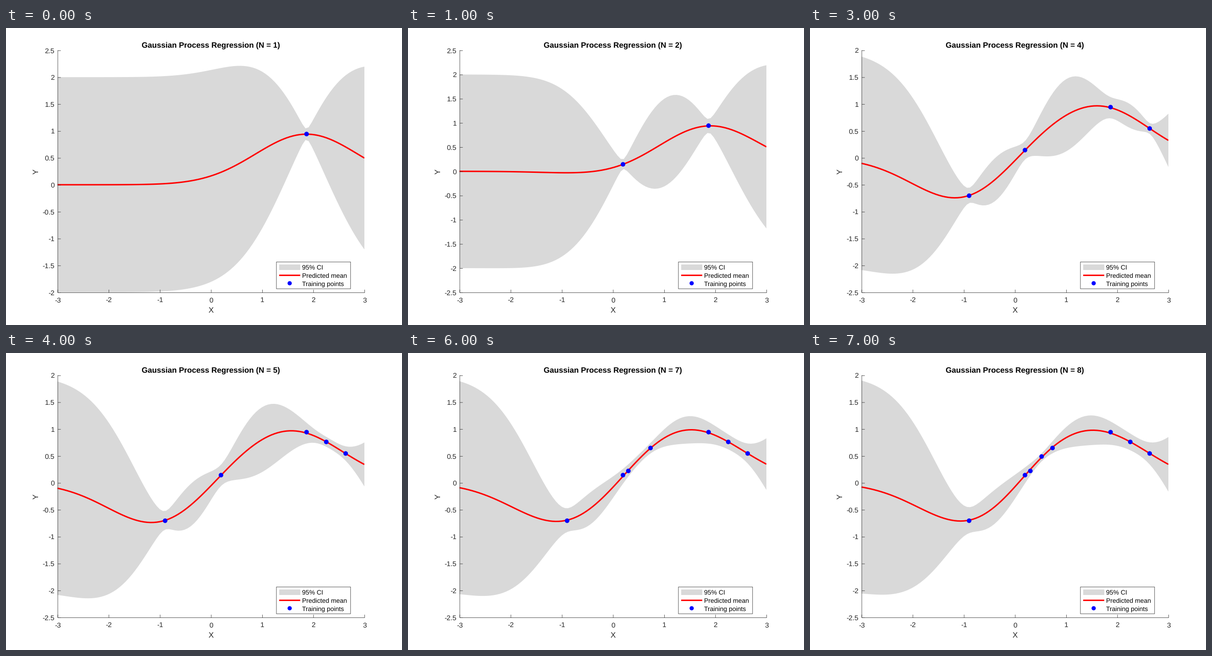
Recreate the animation shown at these times as a matplotlib script. Size 864 px wide and 648 px high, loop 8 s.

```python
import numpy as np
import matplotlib.pyplot as plt
from matplotlib.animation import FuncAnimation
from matplotlib.lines import Line2D
from matplotlib.patches import Circle, Rectangle

W, H, DPI = 864, 648, 100
LEFT, RIGHT = 0.13 * W, 0.905 * W
TOP, BOTTOM = 0.075 * H, 0.89 * H
PT = 72 / DPI  # points per pixel
INK, GREY = "#262626", "#d9d9d9"
HAIR, TICK = 0.8, 6.5  # axis line width and tick length in pixels
SHIFT = 0.7  # axis lines sit slightly right of and below the plot edge
NOISE = 0.05 ** 2

plt.rcParams["font.family"] = "Liberation Sans"
plt.rcParams["text.hinting"] = "none"

# Training samples in the order they arrive
train_x = 6 * np.array([.8116, .5328, .3507, .9390, .8759, .5502, .6225, .5870]) - 3
train_y = np.array([.943, .144, -.704, .546, .761, .222, .648, .490])
grid = np.linspace(-3, 3, 100)


def kernel(a, b):
    return np.exp(-0.5 * (a[:, None] - b[None, :]) ** 2)


def predict(n):
    """Posterior mean and two-sigma band; older samples gather more noise."""
    x, y = train_x[:n], train_y[:n]
    cov = kernel(x, x) + NOISE * np.diag(np.arange(n, 0, -1))
    cross = kernel(x, grid)
    weights = np.linalg.solve(cov, cross)
    var = 1 - np.sum(cross * weights, axis=0)
    return weights.T @ y, 2 * np.sqrt(np.maximum(var, 0))


def y_limits(n):
    return (-2 if n == 1 else -2.5), (2.5 if n <= 3 else 2)


def px(x):
    return LEFT + (x + 3) / 6 * (RIGHT - LEFT)


def py(y, lo, hi):
    return BOTTOM - (y - lo) / (hi - lo) * (BOTTOM - TOP)


fig = plt.figure(figsize=(W / DPI, H / DPI), dpi=DPI, facecolor="white")

ax = fig.add_axes([LEFT / W, 1 - BOTTOM / H, (RIGHT - LEFT) / W, (BOTTOM - TOP) / H])
ax.set_xlim(-3, 3)
ax.axis("off")
band, = ax.fill([0, 0, 0], [0, 0, 0], color=GREY, linewidth=0, zorder=1)
mean_line, = ax.plot([], [], color="red", lw=3.1 * PT, zorder=3,
                     solid_capstyle="butt")

# Overlay in pixels, measured from the top left
over = fig.add_axes([0, 0, 1, 1], zorder=5)
over.set(xlim=(0, W), ylim=(H, 0))
over.axis("off")


def put(x, y, text, size, color=INK, ha="center", **kw):
    """Text with its baseline at pixel (x, y)."""
    return over.text(x, y, text, fontsize=size * PT, color=color,
                     ha=ha, va="baseline", zorder=6, **kw)


def stroke(xs, ys, color=INK, width=HAIR):
    line = Line2D(xs, ys, color=color, lw=width * PT, solid_capstyle="butt",
                  snap=False, zorder=4)
    return over.add_line(line)


def dot(x, y, radius):
    return over.add_patch(Circle((x, y), radius, fc="blue", lw=0, zorder=5))


# Axis lines, ticks and labels
axis_x, axis_y = LEFT + SHIFT, BOTTOM + SHIFT
stroke([axis_x, axis_x], [TOP, axis_y])
stroke([axis_x, RIGHT + SHIFT], [axis_y, axis_y])
for v in range(-3, 4):
    x = px(v) + SHIFT
    stroke([x, x], [axis_y, axis_y - TICK])
    put(px(v) + 0.4, 598.4, str(v), 15.43)
y_ticks = [stroke([], []) for _ in range(11)]
y_labels = [put(106, 0, "", 15.43, ha="right") for _ in range(11)]

mid_x = (LEFT + RIGHT) / 2
title = put(mid_x, 42.6, "", 16.97, "black", weight="bold")
put(mid_x, 620.7, "X", 16.97)
put(70.4, 313, "Y", 16.97, rotation=90, rotation_mode="anchor")
dots = [dot(0, 0, 5) for _ in train_x]

# Legend
over.add_patch(Rectangle((590, 510.4), 161.8, 58.6, fc="white", ec=INK,
                         lw=HAIR * PT, snap=False))
over.add_patch(Rectangle((596, 515.5), 46, 12.5, fc=GREY, lw=0))
stroke([596, 642], [539.6, 539.6], "red", 3.1)
dot(618.9, 556.9, 4.6)
for base, name in ((527.2, "95% CI"), (545, "Predicted mean"), (562.7, "Training points")):
    put(646, base, name, 14, "black", ha="left")


def draw_y_axis(lo, hi):
    ax.set_ylim(lo, hi)
    values = np.arange(lo, hi + 0.25, 0.5)
    for k, (tick, label) in enumerate(zip(y_ticks, y_labels)):
        shown = k < len(values)
        tick.set_visible(shown)
        label.set_visible(shown)
        if shown:
            y = py(values[k], lo, hi)
            tick.set_data([axis_x, axis_x + TICK], [y + SHIFT, y + SHIFT])
            label.set_text(f"{values[k]:g}")
            label.set_y(y + 5.8)


def draw(i):
    n = i + 1
    lo, hi = y_limits(n)
    draw_y_axis(lo, hi)

    mean, spread = predict(n)
    upper = np.column_stack([grid, mean + spread])
    lower = np.column_stack([grid, mean - spread])
    band.set_xy(np.vstack([upper, lower[::-1]]))
    mean_line.set_data(grid, mean)
    for k, circle in enumerate(dots):
        circle.set_visible(k < n)
        circle.center = px(train_x[k]), py(train_y[k], lo, hi)
    title.set_text(f"Gaussian Process Regression (N = {n})")
    return band, mean_line, title


anim = FuncAnimation(fig, draw, frames=8, interval=1000, repeat=True)
plt.show()
```
